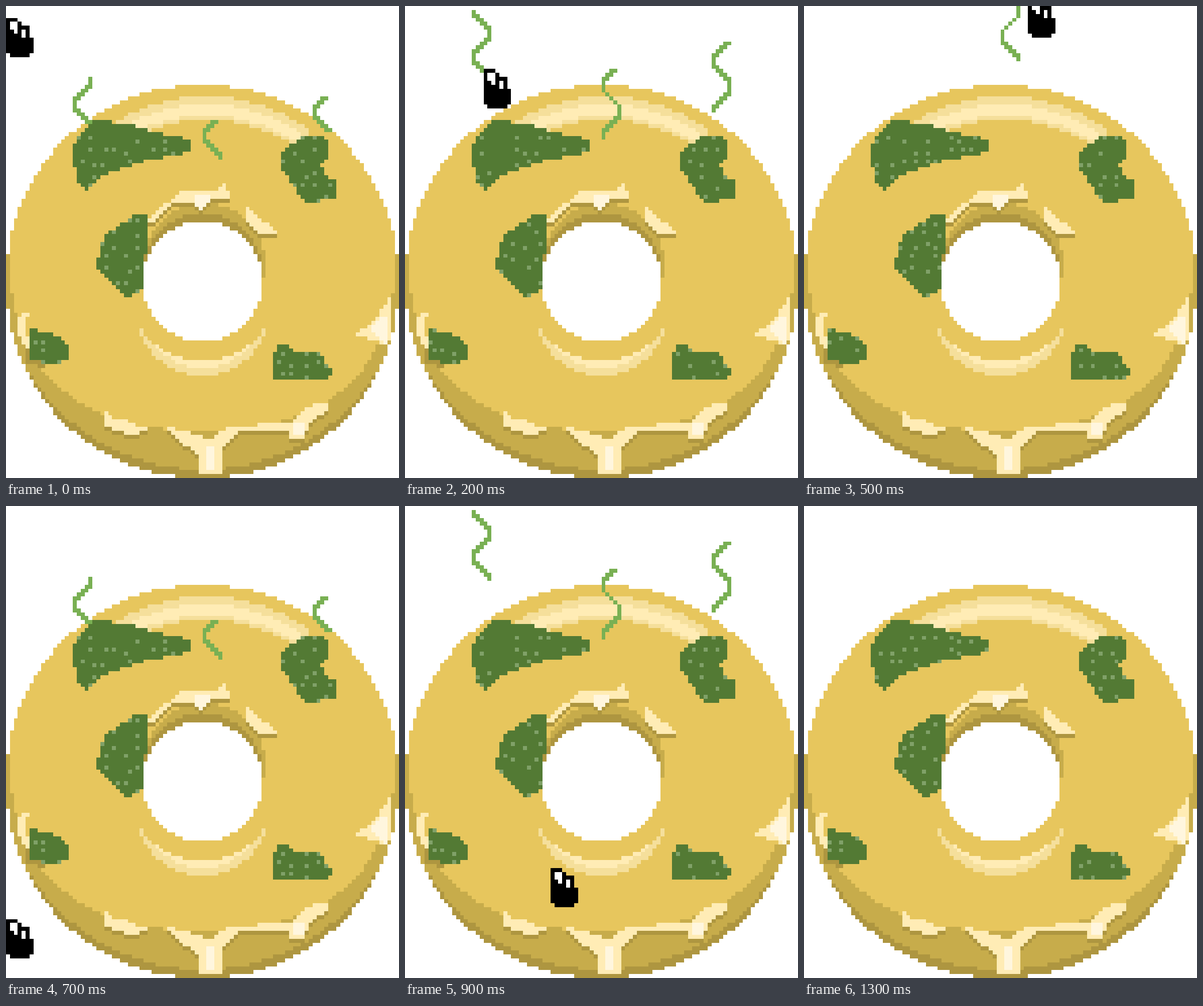
An HTML page with a canvas that plays this animation: 683x820 px, repeating every 1.4 s.

```html
<!DOCTYPE html>
<html lang="en">
<head>
<meta charset="utf-8">
<title>Mouldy doughnut</title>
<style>
html, body { margin: 0; width: 100%; height: 100%; overflow: hidden; background: #fff; }
canvas { display: block; width: 100%; height: 100%; image-rendering: pixelated; }
</style>
</head>
<body>
<canvas id="stage" width="100" height="120"></canvas>
<script>
const W = 100, H = 120, STEP = 100, CYCLE = 7;
const stage = document.getElementById('stage').getContext('2d');
const base = document.createElement('canvas');
base.width = W;
base.height = H;
const back = base.getContext('2d');

const WHITE = '#fff', FACE = '#e7c65d', SIDE = '#c7ac4b', DARK = '#ae9640';
const PALE = '#f5df9b', LIGHT = '#ffecb5', GLOSS = '#fff6de';
const MOULD = '#537a34', SPORE = '#80a168', FUME = '#79b053';

function cell(g, x, y, color, w = 1, h = 1) {
  g.fillStyle = color;
  g.fillRect(x, y, w, h);
}

// Fill every cell whose centre passes the test
function paint(test, color, g = back) {
  for (let y = 0; y < H; y++)
    for (let x = 0; x < W; x++)
      if (test(x + 0.5, y + 0.5)) cell(g, x, y, color);
}

// Shapes are tests on a point; p > 2 squares the disc off
const disc = (cx, cy, rx, ry = rx, p = 2) => (x, y) =>
  Math.abs((x - cx) / rx) ** p + Math.abs((y - cy) / ry) ** p <= 1;
const box = (l, t, r, b) => (x, y) => x > l && x < r && y > t && y < b;
const both = (a, b) => (x, y) => a(x, y) && b(x, y);
const minus = (a, b) => (x, y) => a(x, y) && !b(x, y);

function poly(text) {
  const pts = text.split(' ').map(p => p.split(',').map(Number));
  return (x, y) => {
    let inside = false;
    pts.forEach(([ax, ay], i) => {
      const [bx, by] = pts[(i + 1) % pts.length];
      if (ay > y !== by > y && x < ax + (y - ay) * (bx - ax) / (by - ay)) inside = !inside;
    });
    return inside;
  };
}

// Cream with a shadow just below it
function glaze(text) {
  const shape = poly(text);
  paint((x, y) => shape(x, y - 1), DARK);
  paint(shape, LIGHT);
}

const patches = [
  '23,29 31,30 40,32.5 47,34 47,37 33,40 25,43 21,47 18,45 17,36 19,32',
  '76,33 81,33 82,35 82,38.5 80,40 82,44 84,44 84,49 76,50 70,41 70,37',
  '32,53.5 36,53 36,63 35,63 35,72 31,74 23,66 25,58.5',
  '6,82 14,84 16,87 16,90 12,91 6,90',
  '69,86.5 72,86 74,88 80,88 83,93 82,95 68,95 68,89'
].map(poly);
const mouldy = (x, y) => patches.some(p => p(x, y));

function bake() {
  const body = disc(50, 70, 50, 50, 2.04);
  paint(() => true, WHITE);
  paint(body, DARK);
  paint(both(body, disc(50, 66, 52, 51.8)), SIDE);
  paint(both(body, disc(50, 64, 49, 44, 2.35)), FACE);

  const sheen = box(27, 20, 77, 35);
  paint(both(sheen, minus(disc(51, 67.6, 44.6), disc(51, 72.3, 43.3))), PALE);
  paint(both(sheen, minus(disc(51, 68, 43), disc(51, 72.3, 44.3))), LIGHT);

  const lip = disc(50, 70.7, 19.4);
  paint(minus(disc(50, 77, 17), lip), PALE);
  paint(minus(disc(50, 77, 15), lip), LIGHT);

  paint(disc(50.5, 65.5, 15.5), SIDE);
  paint(disc(50, 67.9, 15.2), DARK);
  paint(disc(50, 70, 15.4), WHITE);
  glaze('36,55 41,50 45,47 53,47 56,45 57,49 53,49 50,52 48,50 44,50 41,51 38,55');
  paint(poly('48,48 52,48 52,50 50,52 48,50'), GLOSS);
  glaze('61,51 62,51 66,55 69,57 69,58 65,58 61,54');

  paint(poly('98,73 98,84 97,86 89,83.5 94,80'), LIGHT);
  paint(poly('95,79 97,79 97,86 93,82'), GLOSS);
  paint(poly('5,78 6,78 5,80 6,87 5,87 3,83 3,80'), LIGHT);

  glaze('25,103 28,105.5 31,105.5 34,107 38,106.5 33,109 30,108.5 25,107');
  glaze('41,107 49,109 52,110 57,107 72,106 76,102.5 79,101 82,101 82,103 77,106 76,110 72,110 72,108 59,108 55,113 55,119 49,119 49,114 42,109');
  paint(box(51, 112, 53, 118), GLOSS);
  paint(box(73, 106, 76, 109), GLOSS);

  paint((x, y) => mouldy(x + 1, y - 1) && box(5, 87, 10, 92)(x, y), DARK);
  paint(mouldy, MOULD);
}

function rand(a, b, c) {
  const s = Math.sin(a * 127.1 + b * 311.7 + c * 74.7) * 43758.5453;
  return s - Math.floor(s);
}

// One jittered spore in most 3x3 blocks of mould
function spores(k) {
  for (let y = 33; y < 96; y += 3)
    for (let x = 6; x < 87; x += 3) {
      if (rand(x, y, k) > 0.68) continue;
      const sx = x + Math.floor(rand(y, x, k + 9) * 2);
      const sy = y + Math.floor(rand(x, y, k + 20) * 2);
      if (mouldy(sx + 0.5, sy + 0.5)) cell(stage, sx, sy, SPORE);
    }
}

// A standing wave seen through a rising window
const fumes = [
  { x: 19, crest: 12.5, period: 12, top: 18, rise: 8.5, end: 30, tail: 38, fall: 9.5, life: 4 },
  { x: 52, crest: 19.8, period: 12.6, top: 29, rise: 6.7, end: 39, tail: 47.5, fall: 6.8, life: 6 },
  { x: 80, crest: 13.5, period: 13, top: 23, rise: 7, end: 32, tail: 41, fall: 7, life: 5 }
];

function smoke(f, k) {
  if (k >= f.life) return;
  const wave = y => Math.round(f.x - 2.2 * Math.cos((y - f.crest) * 2 * Math.PI / f.period));
  const end = Math.min(f.end, Math.round(f.tail - f.fall * k));
  for (let y = Math.round(f.top - f.rise * k); y < end; y++) {
    const a = wave(y - 0.4), b = wave(y + 0.4);
    cell(stage, Math.min(a, b), y, FUME, Math.abs(a - b) + 1);
  }
}

function fly(x, y) {
  const part = (l, t, w, h, color = '#000') => cell(stage, x + l, y + t, color, w, h);
  paint(disc(x + 3.5, y + 7, 3.7, 3.1), '#000', stage);
  part(0, 0, 3, 6);
  part(3, 1, 1, 5);
  part(4, 2, 2, 4);
  part(1, 1, 2, 2, WHITE);
  part(2, 3, 1, 1, WHITE);
  part(4, 3, 1, 2, WHITE);
}

// Two swoops: over the top, then across the bottom
const swoops = [
  k => [9.07 * k + 0.467 * k * k, 3 + 11.5 * k - 2.5 * k * k],
  k => [19.1 * k - 0.3 * k * k, 105 - 11.75 * k + 2.625 * k * k]
];

function draw(now) {
  const n = Math.floor(now / STEP), k = n % CYCLE;
  stage.drawImage(base, 0, 0);
  spores(k);
  fumes.forEach(f => smoke(f, k));
  fly(...swoops[Math.floor(n / CYCLE) % 2](k).map(Math.round));
}

bake();
const start = performance.now();
function tick() {
  draw(performance.now() - start);
  requestAnimationFrame(tick);
}
tick();
</script>
</body>
</html>
```
